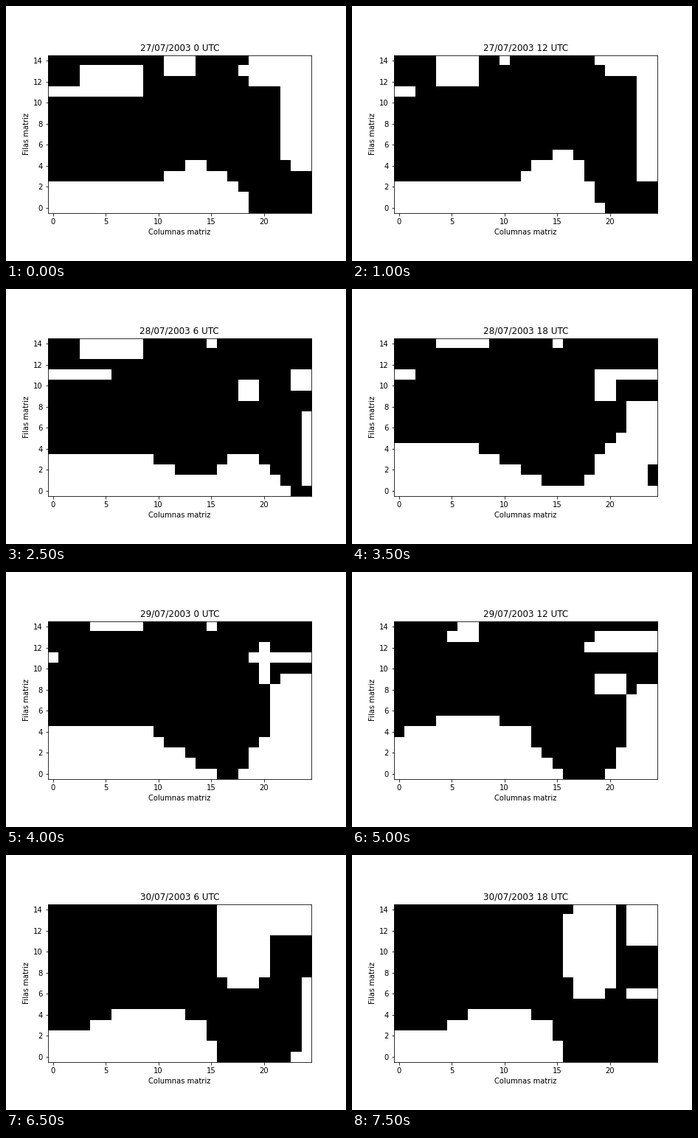
A matplotlib script for the animation above (8 s loop, 461x346 px).

```python
import numpy as np
import matplotlib.pyplot as plt
from matplotlib.animation import FuncAnimation

W, H, DPI = 461, 346, 72
ROWS, COLS, STEPS = 15, 25, 16
y, x = np.mgrid[:ROWS, :COLS]


def bell(d, width, power=2):
    return np.exp(-np.abs(d / width) ** power)


def coast(t):
    """Height of the clear strip along the bottom, per column."""
    level = 3 + 2 * bell(t - 8, 3.5)
    edge = np.interp(t, [0, 2, 6, 15], [19.2, 20, 16.5, 16])
    slope = 2 + 8 * bell(t - 6.3, 3.3)
    shelf = level * np.clip((edge - x) / slope, 0, 1)
    # One swell runs out to the east, a later one settles in the middle.
    east = (1.8 + 0.55 * t) * bell(x - 13.3 - 1.04 * t, 2.8)
    middle = 10.3 - 7.3 * np.exp((8 - t) / 3)
    west = 2 * np.clip((t - 7) / 4, 0, 1) * bell(x - middle, 4.3, 4)
    return shelf + east + west


def blob(t, *keys):
    """Rounded box drifting through keys of (time, cx, cy, rx, ry)."""
    times, *tracks = np.array(keys).T
    if not times[0] <= t <= times[-1]:
        return np.zeros((ROWS, COLS), bool)
    cx, cy, rx, ry = (np.interp(t, times, track) for track in tracks)
    return ((x - cx) / rx) ** 4 + ((y - cy) / ry) ** 4 < 1


def clear_cells(t):
    clear = y + 0.5 < coast(t)
    # north-west gap and the strip below it
    clear |= blob(t, (0, 5.5, 12, 2.8, 1.4), (2, 5.5, 13, 2.2, 1.5),
                  (5, 5.5, 13.5, 3, 0.9), (8, 6.2, 14.2, 2.6, 0.8),
                  (11, 6, 13, 0.6, 0.6))
    clear |= blob(t, (0, 0, 11, 2.5, 0.6), (2, 0, 11, 1.7, 0.6),
                  (5, 0, 11, 5.5, 0.6), (8, 0, 11, 0.1, 0.6))
    # notch in the top edge
    clear |= blob(t, (0, 12, 14, 1.2, 1.2), (2, 10, 14, 0.6, 0.6),
                  (5, 15, 14, 0.6, 0.6), (8, 15, 14, 0.6, 0.6))
    # eastern margin
    clear |= blob(t, (0, 24.5, 8.7, 3, 5.2), (2, 24.5, 9, 2.4, 6.3),
                  (5, 24.5, 4, 1.4, 3.2), (8, 24.5, 6, 3.8, 3.4),
                  (13, 24.5, 4.5, 0.9, 3), (15, 24.5, 6, 2.6, 0.6))
    # north-east corner
    clear |= blob(t, (0, 21.5, 12.9, 3.6, 1.2), (2, 22, 14, 3.2, 1.2),
                  (5, 23.5, 10.5, 0.7, 0.7), (8, 22, 11, 3.2, 0.6),
                  (11, 21.5, 13, 4, 1.4), (15, 23.5, 12.8, 2.2, 2.2))
    # inner gap that opens up late
    clear |= blob(t, (5, 18.5, 9.5, 0.7, 0.7), (8, 20, 10.5, 0.6, 2),
                  (11, 20.5, 8, 2, 0.6), (13, 18, 11, 2.4, 4.1),
                  (15, 18.2, 10.5, 2.3, 4.6))
    return clear.astype(float)


fig, ax = plt.subplots(figsize=(W / DPI, H / DPI), dpi=DPI)
dx, dy = -1 / W, 0.75 / H
fig.subplots_adjust(left=0.125 + dx, right=0.9 + dx,
                    bottom=0.11 + dy, top=0.88 + dy)
image = ax.imshow(clear_cells(0), cmap="gray", vmin=0, vmax=1,
                  origin="lower", interpolation="nearest")
ax.set_xticks(range(0, COLS, 5))
ax.set_yticks(range(0, ROWS, 2))
ax.set_xlabel("Columnas matriz")
ax.set_ylabel("Filas matriz")
title = ax.set_title("")


def draw(i):
    day, quarter = divmod(i, 4)
    image.set_data(clear_cells(i))
    title.set_text(f"{27 + day}/07/2003 {6 * quarter} UTC")
    return image, title


anim = FuncAnimation(fig, draw, frames=STEPS, init_func=lambda: draw(0),
                     interval=500, repeat=True, repeat_delay=0)
plt.show()
```
